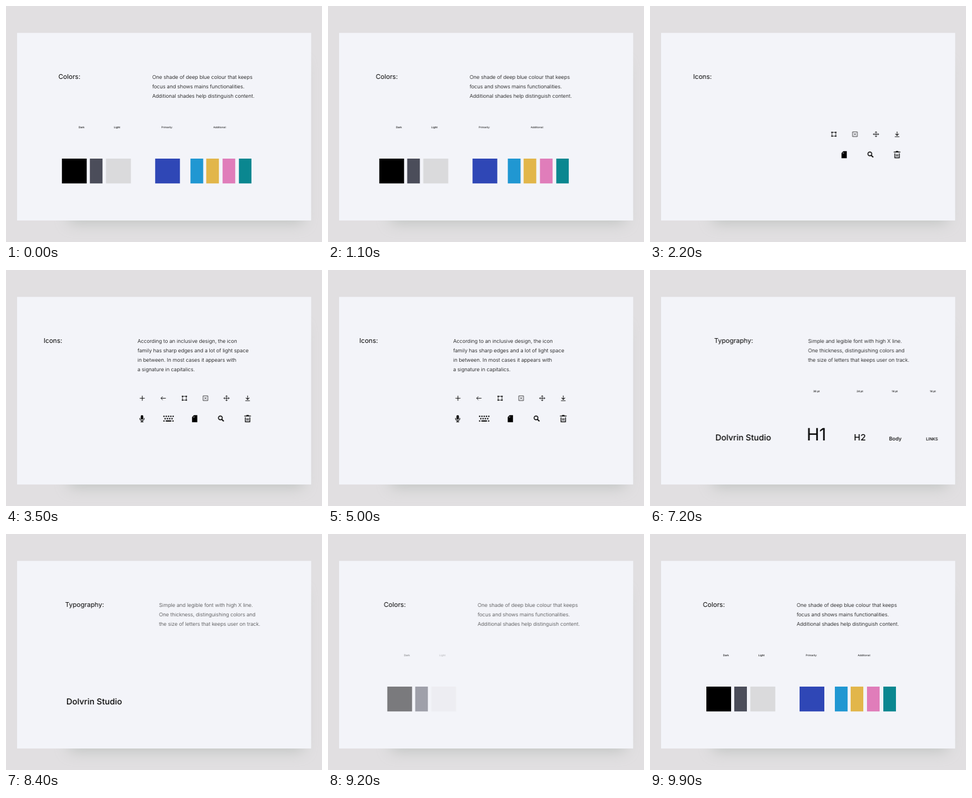
An HTML page that plays this animation: 600x450 px, repeating every 10 s.

```html
<!DOCTYPE html>
<html lang="en">
<head>
<meta charset="utf-8">
<title>Style guide</title>
<style>
html, body { margin: 0; width: 100%; height: 100%; overflow: hidden; background: #e1dfe1; }
svg { display: block; width: 600px; height: 450px; }
text { font-family: Inter, Roboto, sans-serif; font-optical-sizing: none; text-rendering: geometricPrecision; }

/* One shared drift for all slides, ten positions a second */
.drift { animation: drift 10s steps(100) -4.6s infinite; }
@keyframes drift {
  from { transform: translateX(137px); }
  to { transform: translateX(57px); }
}

/* --s shifts each slide in the loop, --i staggers its columns */
.type { --s: -4.6s; }
.colors { --s: -1.2s; }
.icons { --s: -7.9s; }
.head, .body, .parts, .item, .name {
  animation: show 10s steps(4) calc(var(--s) + var(--i, 0) * .1s) infinite both;
}
.head, .parts { animation-timing-function: step-end; }
.type .head { animation-name: show-long; }
.body { animation-name: body; }
.parts { animation-name: leave; }
.item { animation-name: enter; }
.name { animation-name: name; }
@keyframes show {
  0% { opacity: 1; }
  33%, 100% { opacity: 0; }
}
@keyframes show-long {
  0% { opacity: 1; }
  34%, 100% { opacity: 0; }
}
@keyframes body {
  0%, 1% { opacity: 0; }
  5%, 29% { opacity: 1; }
  33%, 100% { opacity: 0; }
}
@keyframes leave {
  0% { opacity: 1; }
  29.5%, 100% { opacity: 0; }
}
@keyframes enter {
  0%, 2% { opacity: 0; }
  5%, 100% { opacity: 1; }
}
@keyframes name {
  0%, 1% { opacity: 0; }
  5%, 33.9% { opacity: 1; }
  34%, 100% { opacity: 0; }
}

.head { font-size: 12.4px; }
.body { font-size: 9.77px; font-weight: 300; }
.label { font-size: 4.9px; }
.strong, .name, .sample { font-weight: 500; }
.name { font-size: 15.7px; }
.line { fill: none; stroke: #000; }
</style>
</head>
<body>
<svg viewBox="0 0 600 450">
  <defs>
    <filter id="soft" x="-20%" y="-20%" width="140%" height="140%">
      <feGaussianBlur stdDeviation="14"/>
    </filter>
  </defs>
  <rect width="600" height="450" fill="#e1dfe1"/>
  <rect x="120" y="110" width="444" height="304" fill="#a9b0ab" opacity=".6" filter="url(#soft)"/>
  <rect x="21" y="51.3" width="558.4" height="357.7" fill="#f3f4f9"/>

  <g class="drift">
    <g class="type">
      <text class="head" x="-.7" y="139">Typography:</text>
      <text class="body" y="138.5">
        <tspan x="177.5">Simple and legible font with high X line.</tspan>
        <tspan x="177.5" dy="18">One thickness, distinguishing colors and</tspan>
        <tspan x="177.5" dy="18">the size of letters that keeps user on track.</tspan>
      </text>
      <text class="name" x="1.5" y="325">Dolvrin Studio</text>
      <g class="parts">
        <g class="item">
          <text class="label strong" x="187.2" y="232.8">36 pt</text>
          <text x="174.7" y="325" font-size="32.5">H1</text>
        </g>
        <g class="item" style="--i:1">
          <text class="label strong" x="269.8" y="232.8">24 pt</text>
          <text class="sample" x="264.6" y="325" font-size="16.5">H2</text>
        </g>
        <g class="item" style="--i:2">
          <text class="label strong" x="336.4" y="232.8">14 pt</text>
          <text class="sample" x="331.3" y="325" font-size="9.6">Body</text>
        </g>
        <g class="item" style="--i:3">
          <text class="label strong" x="408.8" y="232.8">14 pt</text>
          <text class="sample" x="401.4" y="325" font-size="7.8">LINKS</text>
        </g>
      </g>
    </g>

    <g class="colors">
      <text class="head" x="-.7" y="139">Colors:</text>
      <text class="body" y="138.5">
        <tspan x="177.5">One shade of deep blue colour that keeps</tspan>
        <tspan x="177.5" dy="18">focus and shows mains functionalities.</tspan>
        <tspan x="177.5" dy="18">Additional shades help distinguish content.</tspan>
      </text>
      <g class="parts">
        <g class="item">
          <text class="label strong" x="37.8" y="232.8">Dark</text>
          <rect x="6" y="291" width="47" height="47.3"/>
          <rect x="59" y="291" width="24" height="47.3" fill="#4b4d5a"/>
        </g>
        <g class="item" style="--i:1">
          <text class="label strong" x="104.8" y="232.8">Light</text>
          <rect x="89.5" y="291" width="47.4" height="47.3" fill="#dadadc"/>
        </g>
        <g class="item" style="--i:2">
          <text class="label" x="194.8" y="232.8">Primarily:</text>
          <rect x="183" y="291" width="47" height="47.3" fill="#2f47b6"/>
        </g>
        <g class="item" style="--i:3">
          <text class="label" x="293.5" y="232.8">Additional:</text>
          <rect x="250" y="291" width="24.2" height="47.3" fill="#2097d2"/>
          <rect x="280" y="291" width="24" height="47.3" fill="#e2b64a"/>
          <rect x="311" y="291" width="24" height="47.3" fill="#e07dba"/>
          <rect x="342" y="291" width="24" height="47.3" fill="#0a8790"/>
        </g>
      </g>
    </g>

    <g class="icons">
      <text class="head" x="-.7" y="139">Icons:</text>
      <text class="body" y="138.5">
        <tspan x="177.5">According to an inclusive design, the icon</tspan>
        <tspan x="177.5" dy="18">family has sharp edges and a lot of light space</tspan>
        <tspan x="177.5" dy="18">in between. In most cases it appears with</tspan>
        <tspan x="177.5" dy="18">a signature in capitalics.</tspan>
      </text>
      <g class="parts">
        <!-- plus, microphone -->
        <g class="item">
          <path class="line" transform="translate(186.5 244.5)" d="M-4.7 0H4.7M0-4.7V4.7" stroke-width="1.1"/>
          <g transform="translate(186 283.5)">
            <rect x="-2.3" y="-6.8" width="4.6" height="8.6" rx="2.3"/>
            <path class="line" d="M-4-1.2V0A4 3.7 0 0 0 4 0V-1.2M0 3.5V6M-2.6 6H2.6" stroke-width="1.3"/>
          </g>
        </g>

        <!-- back arrow, keyboard -->
        <g class="item" style="--i:1">
          <path class="line" transform="translate(226.5 244.5)" d="M4.7 0H-4.5M-1.2-3.4L-4.6 0L-1.2 3.4"/>
          <g class="line" transform="translate(236.2 283.5)" stroke-width="2.3">
            <path d="M-9.6-4.5H10" stroke-dasharray="2.3 2.05"/>
            <path d="M-7.4 0H8" stroke-dasharray="2.3 2.05"/>
            <path d="M-9.6 4.4H-7.3M-5.2 4.4H5.4M7.5 4.4H9.8"/>
          </g>
        </g>

        <!-- frame, memory card -->
        <g class="item" style="--i:2">
          <g transform="translate(266.5 244.5)">
            <rect class="line" x="-3.6" y="-3.6" width="7.2" height="7.2" stroke-width=".9"/>
            <path d="M-4.8-4.8h2.4v2.4h-2.4zM2.4-4.8h2.4v2.4h-2.4zM-4.8 2.4h2.4v2.4h-2.4zM2.4 2.4h2.4v2.4h-2.4z"/>
          </g>
          <g transform="translate(286 283.5)">
            <path d="M-1.4-6.7H5V6.7H-5V-3z"/>
            <path d="M-3.4-2.2L-.5-5V-2.2z" fill="#f3f4f9" opacity=".7"/>
          </g>
        </g>

        <!-- crossed box -->
        <g class="item" style="--i:3">
          <path class="line" transform="translate(306.5 244.5)" stroke-width=".8"
            d="M-4.5-4.5H4.5V4.5H-4.5zM-2-2L2 2M2-2L-2 2"/>
        </g>

        <!-- move, search -->
        <g class="item" style="--i:4">
          <path class="line" transform="translate(346.5 244.5)" stroke-width=".9"
            d="M-5 0H5M0-5V5M-2-3.2L0-5.2L2-3.2M-2 3.2L0 5.2L2 3.2M-3.2-2L-5.2 0L-3.2 2M3.2-2L5.2 0L3.2 2"/>
          <g class="line" transform="translate(336 283.5)" stroke-width="1.7">
            <circle cx="-1.2" cy="-1.5" r="3.6"/>
            <path d="M1.4 1.2L5.2 5" stroke-width="2.1"/>
          </g>
        </g>

        <!-- download, trash -->
        <g class="item" style="--i:5">
          <path class="line" transform="translate(386.5 244.5)" d="M0-5V2.3M-3.2-.8L0 2.4L3.2-.8M-4.3 4.7H4.3" stroke-width="1.1"/>
          <g class="line" transform="translate(386.5 283.5)" stroke-width="1.5">
            <path d="M-6.2-4.9H6.2M-2.2-6.3H2.2M-4.2-2.6V6.1H4.2V-2.6"/>
            <path d="M-1.2-1V3.8M1.2-1V3.8" stroke-width="1.2"/>
          </g>
        </g>
      </g>
    </g>
  </g>
</svg>
</body>
</html>
```
